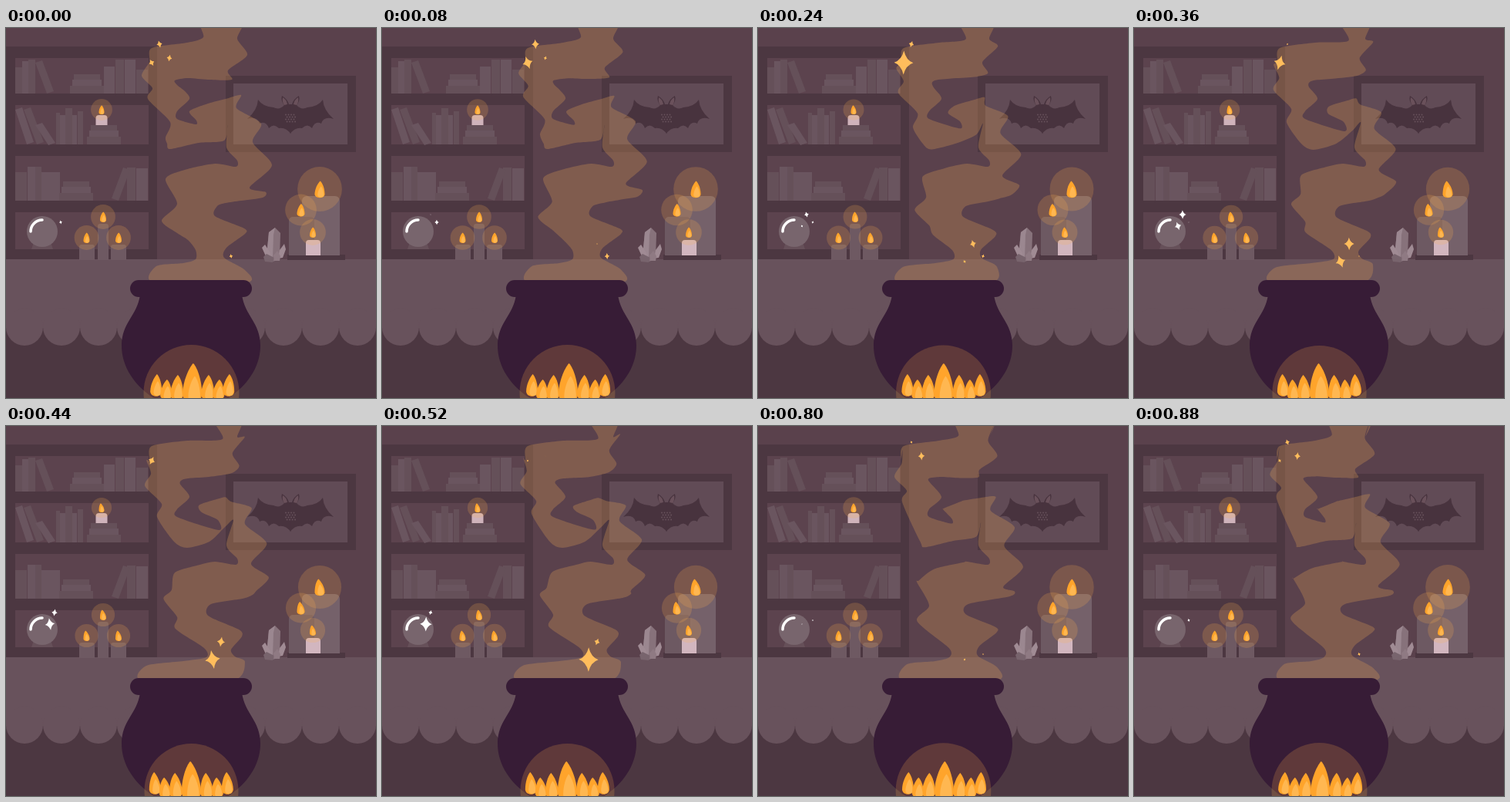
An HTML page with a canvas for the animation above (920 ms loop, 480x480 px).

```html
<!DOCTYPE html>
<html lang="en">
<head>
<meta charset="utf-8">
<title>Cauldron</title>
<style>
html, body { margin: 0; width: 100%; height: 100%; overflow: hidden; background: #5a414c; }
canvas { display: block; width: 480px; height: 480px; }
</style>
</head>
<body>
<canvas id="stage" width="480" height="480"></canvas>
<script>
const ctx = document.getElementById('stage').getContext('2d');
const LOOP = 920, STEP = 40, TAU = Math.PI * 2;
const DARK = '#4c3741', WALL = '#5a414c', BOOK = '#6a555f', BOOK2 = '#655059', TABLE = '#68525c';
const GLOW = 'rgba(255,174,78,.2)';

function rect(color, x, y, w, h, r = 0) {
  ctx.fillStyle = color;
  ctx.beginPath();
  ctx.roundRect(x, y, w, h, r);
  ctx.fill();
}
function circle(color, x, y, r) {
  ctx.fillStyle = color;
  ctx.beginPath();
  ctx.arc(x, y, r, 0, TAU);
  ctx.fill();
}
function shape(color, path) {
  ctx.fillStyle = color;
  ctx.fill(new Path2D(path));
}

// Smoke outline: the left edge runs upward, the right edge downward.
const leftEdge = [[192, 330], [195, 309], [230, 305], [246, 300], [246, 288], [236, 275], [222, 266],
  [202, 250], [222, 228], [207, 196], [232, 184], [271, 176], [298, 180], [300, 172], [286, 155],
  [288, 126], [283, 146], [250, 149], [213, 157], [209, 150], [207, 142], [213, 122], [184, 92],
  [190, 78], [176, 62], [186, 44], [189, 26], [235, 19], [256, 12], [254, -8]];
const rightEdge = [[306, -8], [300, 14], [313, 35], [288, 55], [293, 67], [262, 67], [236, 65], [219, 68],
  [222, 74], [232, 82], [238, 92], [222, 108], [222, 118], [246, 125], [247, 120], [238, 108], [262, 98],
  [285, 92], [305, 87], [299, 104], [331, 124], [320, 148], [345, 178], [316, 207], [337, 213], [333, 220],
  [305, 224], [285, 227], [274, 231], [271, 244], [309, 260], [310, 267], [286, 285], [283, 298],
  [310, 314], [312, 330]];

// Billows rise into the place of a neighbour; other points sway and return.
const within = (i, a, b) => i >= a && i <= b;
const leftClimb = i => within(i, 5, 7) || within(i, 20, 24) ? 2 : within(i, 8, 10) ? 1 : 0;
const rightClimb = i => within(i, 2, 9) || within(i, 18, 27) ? -2 : within(i, 16, 17) ? -1 : 0;
const leftSway = { 0: [-15, 0], 1: [-13, 2], 3: [14, 0], 4: [11, 0], 15: [7, -4], 16: [0, -14], 17: [14, 1],
  18: [22, 1], 19: [9, 0], 28: [25, 5], 29: [16, 0] };
const rightSway = { 5: [18, 0], 13: [30, 10], 14: [28, 2], 15: [16, 4], 28: [-8, 0], 29: [-9, 2],
  30: [-7, 4], 31: [-4, 6], 32: [6, 5], 33: [14, 1], 34: [0, -8], 35: [-18, 0] };

function edgeAt(edge, climb, sway, t) {
  const swing = Math.sin(Math.PI * t) ** 2;
  return edge.map(([x, y], i) => {
    const [nx, ny] = edge[i + climb(i)], [dx, dy] = sway[i] || [0, 0];
    return [x + (nx - x) * t + dx * swing, y + (ny - y) * t + dy * swing];
  });
}
function smoke(t) {
  const pts = [...edgeAt(leftEdge, leftClimb, leftSway, t), ...edgeAt(rightEdge, rightClimb, rightSway, t)];
  const at = i => pts[(i + pts.length) % pts.length];
  const bend = .13;
  ctx.beginPath();
  ctx.moveTo(...pts[0]);
  for (let i = 0; i < pts.length - 1; i++) {
    const [a, b, c, d] = [at(i - 1), at(i), at(i + 1), at(i + 2)];
    ctx.bezierCurveTo(b[0] + (c[0] - a[0]) * bend, b[1] + (c[1] - a[1]) * bend,
      c[0] - (d[0] - b[0]) * bend, c[1] - (d[1] - b[1]) * bend, c[0], c[1]);
  }
  ctx.fillStyle = 'rgba(203,145,84,.34)';
  ctx.fill();
}

function drop(color, x, base, w, h, sway) {
  const tip = x + sway, top = base - h, r = w / 2;
  ctx.fillStyle = color;
  ctx.beginPath();
  ctx.moveTo(tip, top);
  ctx.bezierCurveTo(tip + r * .5, top + h * .12, x + r, base - h * .55, x + r, base - h * .28);
  ctx.bezierCurveTo(x + r, base, x - r, base, x - r, base - h * .28);
  ctx.bezierCurveTo(x - r, base - h * .55, tip - r * .5, top + h * .12, tip, top);
  ctx.fill();
}
function flame(x, base, w, h, sway) {
  drop('#ffa42b', x, base, w, h, sway);
  drop('#ffb751', x + w * .1, base - h * .04, w * .62, h * .66, sway * .6);
}
function candleLight(x, y, r, w, t) {
  const sway = Math.cos(TAU * t), h = w * 1.8;
  circle(GLOW, x, y, r + sway * .4);
  flame(x, y + h * .55, w, h, sway * w * .09 - .5);
}

function star(color, x, y, peak, size, t) {
  let d = t - peak;
  d -= Math.round(d);
  const r = size * (1 - Math.abs(d) / .35);
  if (r <= 0) return;
  const w = r * .8, n = r * .2;
  ctx.save();
  ctx.translate(x, y);
  ctx.rotate(d * 2);
  shape(color, `M0 ${-r}Q${n} ${-n} ${w} 0Q${n} ${n} 0 ${r}Q${-n} ${n} ${-w} 0Q${-n} ${-n} 0 ${-r}`);
  ctx.restore();
}

function upright(bottom, books) {
  books.forEach(([x, top, w], i) => rect(i % 2 ? BOOK : BOOK2, x, top, w, bottom - top));
}
function stack(x, bottom) {
  rect(BOOK2, x, bottom - 10, 44, 10);
  rect(BOOK, x + 3, bottom - 18, 38, 8);
  rect(BOOK2, x + 5, bottom - 25, 34, 7);
}
function leaning(color, x, bottom, h, slant) {
  shape(color, `M${x} ${bottom}l${slant} ${-h}l9 ${Math.sign(slant) * 3}l${-slant} ${h}Z`);
}
function shelf() {
  rect(DARK, 0, 24, 196, 277);
  for (const [y, h] of [[39, 46], [100, 51], [166, 58], [239, 48]]) rect('#5c434e', 12, y, 173, h);
  upright(85, [[12, 51, 9], [21, 43, 8], [29, 41, 9], [127, 50, 14], [142, 41, 11], [154, 41, 14], [169, 54, 15]]);
  leaning(BOOK2, 53, 85, 40, -15);
  stack(83, 85);
  leaning(BOOK, 27, 151, 45, -15);
  leaning(BOOK2, 40, 151, 45, -17);
  leaning(BOOK, 55, 152, 26, -17);
  upright(151, [[65, 110, 5], [70, 113, 7], [77, 104, 9], [86, 113, 6], [93, 108, 7]]);
  stack(105, 151);
  upright(224, [[12, 187, 15], [28, 180, 10], [38, 180, 8], [46, 187, 24], [157, 181, 11], [169, 182, 15]]);
  stack(69, 224);
  leaning(BOOK2, 137, 221, 40, 15);
  rect('#cfb3bb', 116.5, 113, 15, 13, [4, 4, 0, 0]);
}

function crystalBall() {
  shape('#665059', 'M36 278H58L61 287H33Z');
  circle('#78656d', 47, 264, 20);
  ctx.strokeStyle = '#fff';
  ctx.lineWidth = 3.5;
  ctx.lineCap = 'round';
  ctx.beginPath();
  ctx.arc(47, 264, 15, Math.PI, Math.PI * 1.5);
  ctx.stroke();
}

function batPicture() {
  rect(DARK, 285, 62, 169, 99);
  rect('#614b56', 295, 72, 148, 79);
  for (const side of [1, -1]) {
    ctx.save();
    ctx.translate(369, 110);
    ctx.scale(side, 1);
    shape('#48333e', 'M.5 -11L-2 -11Q-4 -18 -11 -22Q-13 -16 -8 -10Q-14 -3 -22 -7Q-36 -8 -42 -17Q-43 -3 -56 8' +
      'Q-43 4 -40 14Q-32 10 -28 20Q-22 13 -15 20Q-7 18 .5 27Z');
    shape('#6a515b', 'M-10 -20Q-5 -17 -4 -11L-8 -10Q-11 -14 -10 -20Z');
    ctx.restore();
  }
  for (let i = 0; i < 16; i++) {
    const row = i >> 2;
    circle('#66505a', 363 + (i % 4) * 3.5 + (row % 2) * 1.6, 112.5 + row * 3, 1);
  }
}

function rightCandles() {
  rect(DARK, 365, 294, 75, 7);
  rect('#75616a', 384, 218, 49, 77, [6, 6, 0, 0]);
  rect('#6d5962', 367, 245, 33, 50, [5, 5, 0, 0]);
  rect('#d2b6bf', 389, 275, 19, 20, [4, 4, 0, 0]);
}

function crystals() {
  shape('#87727b', 'M338 296L341 265L349 259L356 266L355 298L347 303Z');
  shape('#9b8790', 'M346 299L347 268L349 259L341 265L338 296Z');
  shape('#a08b94', 'M332 285L336 281L343 292L344 301L337 296Z M353 299L355 288L361 280L363 287L359 298Z');
  shape('#78646d', 'M334 297L338 293L348 298L346 304L336 303Z');
  shape('#8f7a83', 'M347 295L352 289L356 296L355 302L348 302Z');
}

function table() {
  rect(DARK, 0, 300, 480, 180);
  rect(TABLE, 0, 300, 480, 89);
  for (let x = 24; x < 480; x += 48) circle(TABLE, x, 388, 24);
}

function cauldron() {
  shape('#371c36', 'M174 346C170 374 150 382 150 412C150 442 170 468 198 484H282C310 468 330 442 330 412C330 382 310 374 306 346Z');
  rect('#371c36', 161, 327, 158, 22, 11);
}

function fire(t) {
  const sway = Math.cos(TAU * t);
  circle(GLOW, 240.5, 473, 61.5 + sway * .5);
  for (const [offset, top, w, base] of [[47, 449, 15, 480], [20, 450, 17, 485], [0, 435, 25, 490], [34, 456, 15, 484]])
    for (const side of offset ? [-1, 1] : [1])
      flame(241 + side * offset + sway * .7, base, w, base - top, sway * 1.2);
}

function draw() {
  const t = Math.floor(performance.now() % LOOP / STEP) * STEP / LOOP;
  rect(WALL, 0, 0, 480, 480);
  shelf();
  batPicture();
  crystalBall();
  table();
  for (const [x, y, w] of [[95, 281, 20], [119, 254, 14], [136, 281, 20]])
    rect('#6e5962', x, y, w, 301 - y, [3, 3, 0, 0]);
  rightCandles();
  crystals();
  for (const light of [[124, 106, 13.5, 7], [126, 245, 15.5, 8], [104.5, 272, 15.5, 8], [146, 272, 15.5, 8],
    [407, 209, 28.5, 13], [382.5, 236, 20, 10], [398, 265, 16.5, 8]]) candleLight(...light, t);
  smoke(t);
  cauldron();
  fire(t);
  for (const s of [[199, 21, .12, 7], [189, 45, .25, 16], [212, 39, .9, 6], [279, 280, .4, 8.5],
    [268, 303, .56, 16], [292, 296, .12, 4.5]]) star('#ffbd5c', ...s, t);
  for (const s of [[63, 242, .4, 6], [57, 257, .55, 10], [71, 252, .1, 3.5]]) star('#fff', ...s, t);
  requestAnimationFrame(draw);
}
draw();
</script>
</body>
</html>
```
